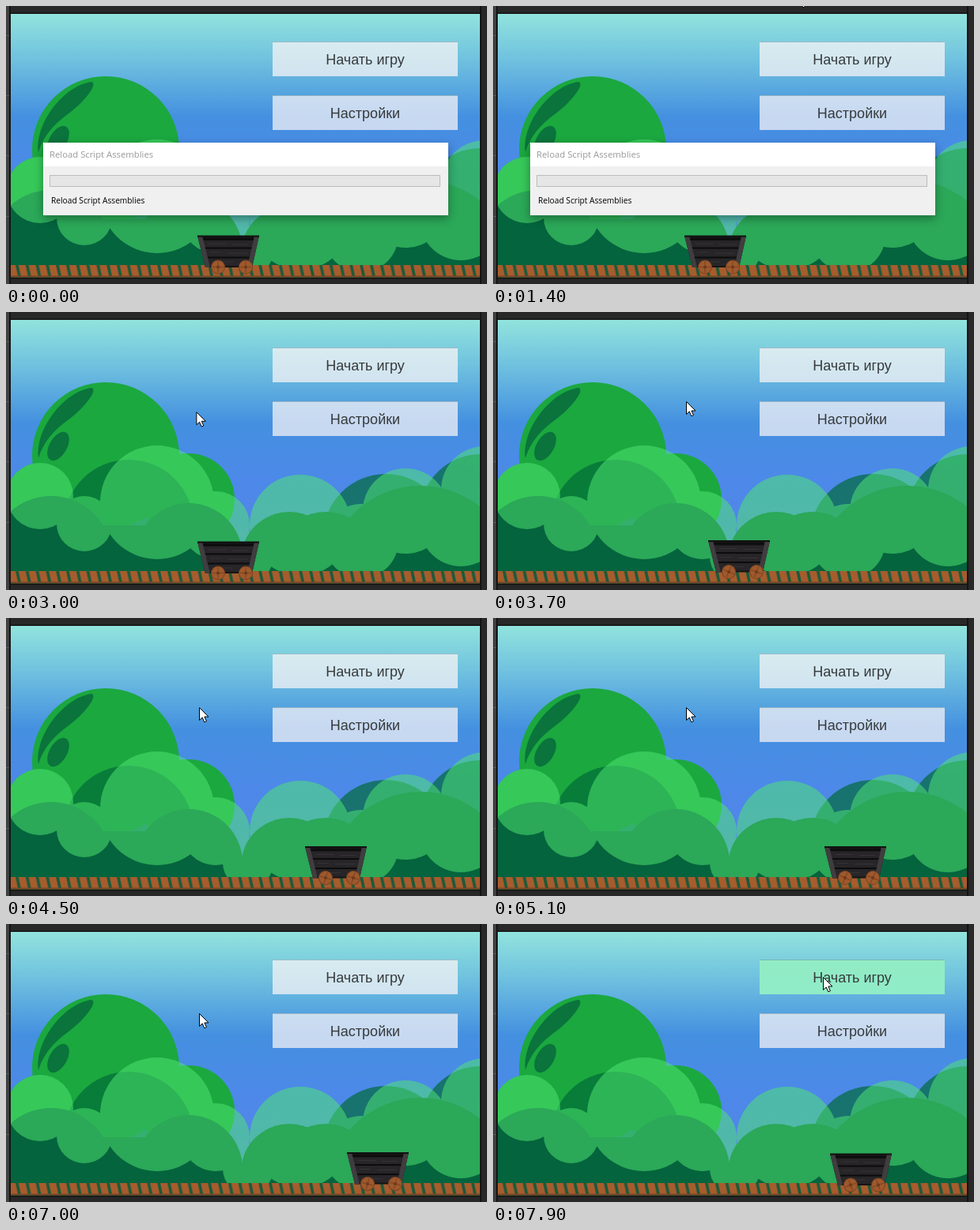
Animation of 608x352 px, one loop 8000 ms. Source, as an HTML page:

```html
<!DOCTYPE html>
<html lang="ru">
<head>
<meta charset="utf-8">
<style>
  html, body { margin: 0; width: 100%; height: 100%; overflow: hidden; background: #282828; }
  svg { display: block; width: 608px; height: 352px; }
  .button { font: 18px "Liberation Sans", Arial, sans-serif; text-anchor: middle; }
  #dialog { font-family: "Open Sans", sans-serif; transform-origin: 303px 219px;
    filter: drop-shadow(0 4px 6px rgba(0, 0, 0, .35)); }
</style>
</head>
<body>
<svg viewBox="0 0 608 352">
  <defs>
    <linearGradient id="sky" gradientUnits="userSpaceOnUse" x1="0" y1="10" x2="0" y2="344">
      <stop offset="0" stop-color="#91e3dd"/>
      <stop offset=".17" stop-color="#70c2df"/>
      <stop offset=".39" stop-color="#4490e0"/>
      <stop offset=".6" stop-color="#4c89e8"/>
      <stop offset="1" stop-color="#5a82ea"/>
    </linearGradient>
    <pattern id="ties" patternUnits="userSpaceOnUse" x="3" y="328" width="12.8" height="16">
      <path d="M0 0H9L12 14H3Z" fill="#a75c2d"/>
    </pattern>
    <clipPath id="stage"><rect x="6" y="10" width="593" height="334"/></clipPath>
  </defs>

  <rect width="608" height="352" fill="#282828"/>
  <rect width="4" height="352" fill="#404040"/>
  <path d="M0 37.5H4M0 113.5H4M0 189.5H4M0 266.5H4" stroke="#5a5a5a"/>
  <path d="M5 0V352M600 0V352M5 9.5H600M5 344.5H600" stroke="#141414" stroke-width="2"/>

  <g clip-path="url(#stage)">
    <rect width="608" height="352" fill="url(#sky)"/>
    <g fill="#1ba83f">
      <circle cx="231" cy="237" r="58"/>
      <circle cx="126" cy="182" r="93"/>
      <circle cx="43" cy="233" r="42"/>
    </g>
    <path d="M41 185C36 150 72 101 108 96C117 98 100 121 78 137C60 150 47 165 41 185Z" fill="#0a743c"/>
    <ellipse cx="66" cy="170" rx="11" ry="20" transform="rotate(30 66 170)" fill="#0a743c"/>

    <!-- Group opacity merges overlapping circles into one translucent shape. -->
    <g fill="#006a39" opacity=".69">
      <circle cx="155" cy="269" r="82"/>
      <circle cx="480" cy="284" r="79"/>
      <circle cx="600" cy="257" r="77"/>
    </g>
    <g fill="#04643d">
      <path d="M6 270H265L298 314H600V344H6Z"/>
      <circle cx="57" cy="310" r="77"/>
      <circle cx="231" cy="310" r="68"/>
      <circle cx="358" cy="314" r="61"/>
      <circle cx="404" cy="316" r="63"/>
      <circle cx="524" cy="340" r="120"/>
    </g>
    <g fill="#50e771" opacity=".52">
      <circle cx="43" cy="233" r="42"/>
      <circle cx="99" cy="268" r="35"/>
      <circle cx="191" cy="241" r="72"/>
      <circle cx="265" cy="270" r="43"/>
      <circle cx="306" cy="310" r="32"/>
      <circle cx="372" cy="270" r="64"/>
      <circle cx="449" cy="290" r="47"/>
      <circle cx="505" cy="252" r="54"/>
      <circle cx="575" cy="270" r="52"/>
      <circle cx="605" cy="225" r="55"/>
    </g>

    <rect y="328" width="608" height="16" fill="#1a5a3a"/>
    <rect y="328" width="608" height="16" fill="url(#ties)"/>
    <path d="M6 342.5H600" stroke="#7a4526" stroke-width="2"/>

    <g id="cart">
      <path d="M0 0H78L69 40H10Z" fill="#161516"/>
      <path d="M7 6H71L64 38H14Z" fill="#272527"/>
      <path d="M7 4H71M9 15.5H69M11 27.5H67" stroke="#0c0c0c" stroke-width="2"/>
      <path d="M14 10H36M44 11H64M16 21H30M38 22H63M18 33H45" stroke="#353335"/>
      <path d="M0 0H6L16 40H10ZM78 0H72L63 40H69Z" fill="#403d40"/>
      <path d="M0 .5H78" stroke="#111" stroke-width="2"/>
      <g class="wheel"></g>
      <g class="wheel"></g>
    </g>

    <g class="button" fill="#363a3c">
      <rect id="start" x="337" y="45" width="234" height="44"/>
      <rect x="337" y="113" width="234" height="44" fill="rgba(255,248,248,.7)"/>
      <path d="M337 45.5H571M337 113.5H571" stroke="#5f8a96" opacity=".5"/>
      <text x="454" y="74">Начать игру</text>
      <text x="454" y="142">Настройки</text>
    </g>
  </g>

  <g id="dialog">
    <rect x="47" y="173" width="512" height="92" fill="#f0f0f0"/>
    <rect x="47" y="173" width="512" height="30" fill="#fff"/>
    <rect x="55.5" y="214.5" width="493" height="14" fill="#e6e6e6" stroke="#bcbcbc"/>
    <text x="55" y="192" font-size="11.3" fill="#999">Reload Script Assemblies</text>
    <text x="57" y="250" font-size="10.2">Reload Script Assemblies</text>
  </g>

  <path id="cursor" d="M.5 .5V16.5L4.2 13L6.8 18.8L9.4 17.7L6.9 12H12Z" fill="#fff" stroke="#000"/>
</svg>

<script>
const $ = id => document.getElementById(id);
const LOOP = 8000, STEP = 100, WHEEL_RADIUS = 8.5, CART_START = 242;

const wheels = [...document.querySelectorAll(".wheel")];
for (const wheel of wheels) wheel.innerHTML =
  `<circle r="${WHEEL_RADIUS}" fill="#9e592d" stroke="#7c4320"/>
   <path d="M-7 0H7M0 -7V7" stroke="#854823" stroke-width="1.5"/>
   <circle r="2" fill="#6d3b1c"/>`;

const clamp = v => Math.min(1, Math.max(0, v));
const ramp = (t, from, to) => clamp((t - from) / (to - from));
const ease = u => u * u * (3 - 2 * u);
const mix = (a, b, u) => a + (b - a) * u;

// Smooth interpolation through [time, value] keys without overshoot.
function track(...keys) {
  const slope = i => (keys[i + 1][1] - keys[i][1]) / (keys[i + 1][0] - keys[i][0]);
  const tangent = i => {
    if (i === 0 || i === keys.length - 1) return 0;
    const a = slope(i - 1), b = slope(i);
    return a * b <= 0 ? 0 : 2 * a * b / (a + b);
  };
  return t => {
    const i = keys.findIndex(key => key[0] > t) - 1;
    if (i === -1) return keys[0][1];
    if (i < 0) return keys[keys.length - 1][1];
    const d = keys[i + 1][0] - keys[i][0], u = (t - keys[i][0]) / d;
    return mix(keys[i][1], keys[i + 1][1], ease(u))
      + d * u * (1 - u) * (tangent(i) * (1 - u) - tangent(i + 1) * u);
  };
}

const cartX = track([3400, CART_START], [3700, 272], [4500, 378], [5400, 434],
  [6200, 463], [7000, 431], [7400, 426]);

// Rests at the toolbar, dips into the scene, waits, then goes to the start button.
function cursorAt(t) {
  const enter = ease(ramp(t, 800, 1000)), down = ease(ramp(t, 2000, 2600));
  const back = ease(ramp(t, 2600, 3100)), toButton = ease(ramp(t, 7000, 7500));
  const x = mix(mix(mix(385, 209, down), 244, back), 417, toButton);
  const y = mix(mix(mix(mix(-22, -17, enter), 241, down), 113, back), 67, toButton);
  return [x, y];
}

// Open at the start, then once more for a moment after the toolbar is used.
const dialogShown = t =>
  1 - ramp(t, 0, 200) + ramp(t, 1200, 1400) - ramp(t, 1500, 1700);

const place = (element, x, y, angle = 0) =>
  element.setAttribute("transform", `translate(${x} ${y}) rotate(${angle})`);

function render(now) {
  const t = Math.floor(now % LOOP / STEP) * STEP;
  const x = cartX(t), moving = ramp(t, 3000, 3400) - ramp(t, 7000, 7400);
  const turn = (x - CART_START) / WHEEL_RADIUS * 180 / Math.PI;
  place($("cart"), x, 291 - 1.5 * moving);
  wheels.forEach((wheel, i) => place(wheel, 26 + 35 * i, 39.5, turn));
  place($("cursor"), ...cursorAt(t));

  const shown = dialogShown(t);
  $("dialog").style.opacity = shown;
  $("dialog").style.transform = `scale(${mix(.92, 1, shown)})`;

  const hover = ramp(t, 7200, 7400);
  $("start").setAttribute("fill", `rgba(${mix(255, 146, hover)},${mix(248, 238, hover)},`
    + `${mix(248, 198, hover)},${mix(.7, .97, hover)})`);
  requestAnimationFrame(render);
}
requestAnimationFrame(render);
</script>
</body>
</html>
```
